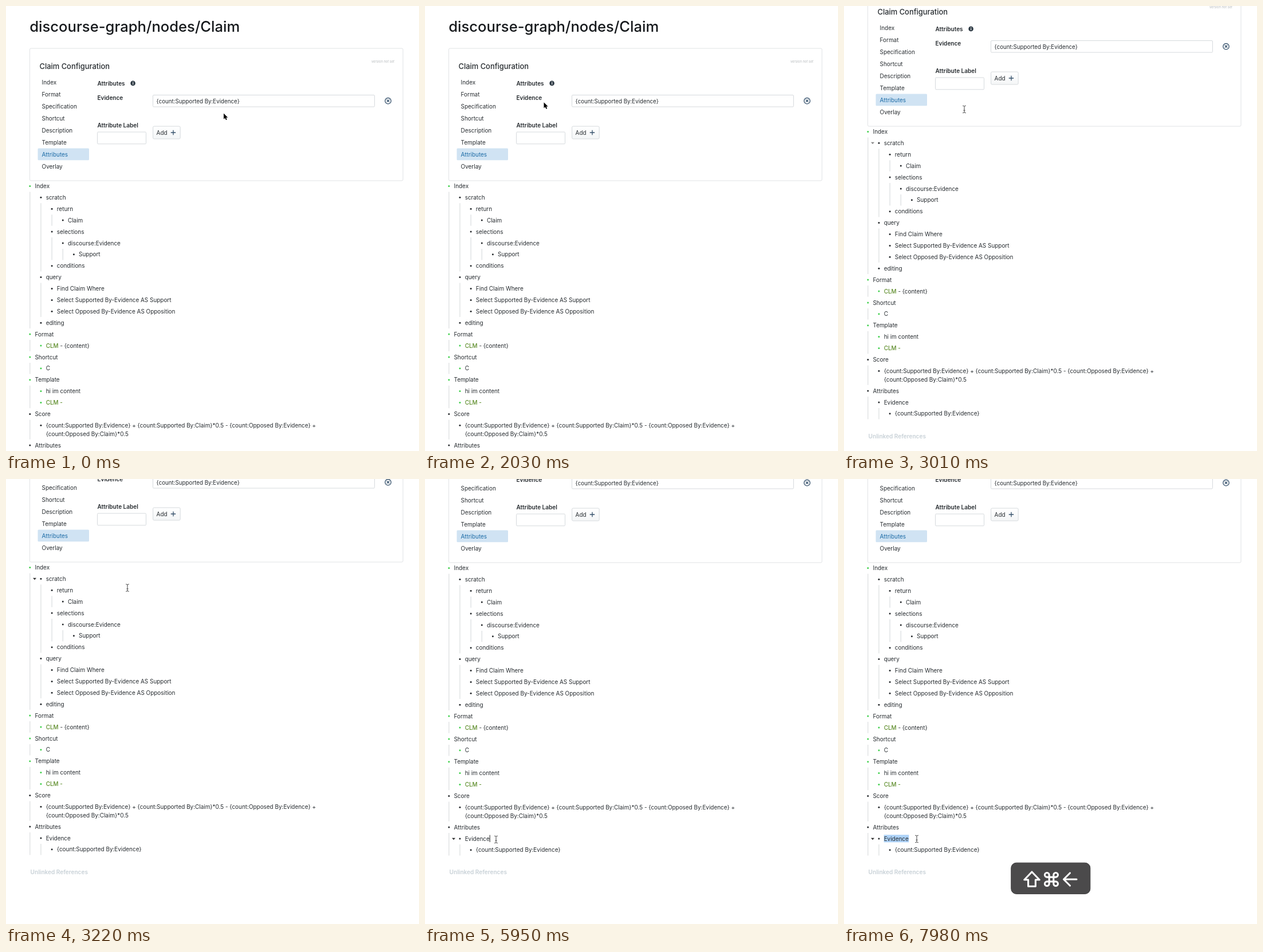
Animation, 721 px wide and 777 px high, one loop 8 s. Source, as an HTML page:

```html
<!DOCTYPE html>
<html lang="en">
<head>
<meta charset="utf-8">
<title>Claim node settings</title>
<style>
  html, body { margin: 0; width: 100%; height: 100%; overflow: hidden; background: #fff; }
  svg { display: block; width: 721px; height: 777px; }
  text { font: 9.93px Inter, "Liberation Sans", sans-serif; fill: #272c30; white-space: pre; }
  .title { font-size: 25.6px; font-weight: 500; fill: #16191c; }
  .head { font-size: 12.9px; font-weight: 500; }
  .strong { font-size: 10.05px; font-weight: 600; }
  .field { font-size: 9.75px; }
  .note { font-size: 5.76px; font-style: italic; fill: #b4b8bb; text-anchor: end; }
  .faint { font-size: 10.05px; font-weight: 600; fill: #c8d1d7; }
  .tag { fill: #5a8a26; font-weight: 500; }
  .active { fill: #1a6aa5; }
  .box { fill: #fff; stroke: #d6dadd; }
  .icon { fill: none; stroke: #34506b; stroke-width: 1.3; }
  .guide { stroke: #dadddf; stroke-width: 1.2; }
  .keys { fill: none; stroke: #fff; stroke-width: 3.1; stroke-linecap: round; stroke-linejoin: round; }
</style>
</head>
<body>
<svg id="stage" viewBox="0 0 721 777">
  <defs>
    <linearGradient id="btn" x2="0" y2="1">
      <stop stop-color="#fff"/><stop offset="1" stop-color="#f4f6f7"/>
    </linearGradient>
  </defs>
  <g id="page">
    <text class="title" x="41.3" y="44.8">discourse-graph/nodes/Claim</text>
    <rect class="box" x="41.5" y="74" width="651.5" height="231" rx="2" style="stroke:#e0e3e5"/>
    <text class="head" x="58.5" y="110">Claim Configuration</text>
    <text class="note" x="678" y="99.2">version not set</text>
    <rect x="55.5" y="248.5" width="89.5" height="20.8" rx="1.5" fill="#d0e3f3"/>
    <g id="menu"></g>
    <text class="strong" x="159.5" y="138.5">Attributes</text>
    <circle cx="221.6" cy="134.9" r="4.3" fill="#2f3b45"/>
    <path d="M221.7 132.1v1.3M221.7 134.3v3" stroke="#fff" stroke-width="1.2"/>
    <text class="strong" x="159.5" y="163.8">Evidence</text>
    <rect class="box" x="256.5" y="155.5" width="387" height="20.5" rx="1.5"/>
    <text class="field" x="262.6" y="169.5">{count:Supported By:Evidence}</text>
    <circle class="icon" cx="667" cy="165.7" r="5.2"/>
    <path class="icon" d="M664.8 163.5l4.4 4.4m0-4.4l-4.4 4.4"/>
    <text class="strong" x="159.5" y="212.2">Attribute Label</text>
    <rect class="box" x="159.5" y="220" width="85" height="20.8" rx="1.5"/>
    <rect class="box" x="256.6" y="210" width="47.6" height="22" rx="2" style="fill:url(#btn)"/>
    <text x="262.6" y="224.6">Add</text>
    <path class="icon" d="M287.8 221h8.4M292 216.8v8.4"/>
    <rect id="mark" x="69.6" y="780.3" width="43.7" height="13" fill="#add2f8"/>
    <g id="tree"></g>
    <path id="caret" d="M113.2 780.6v12.4" stroke="#222" stroke-width="1"/>
    <path id="toggle" d="M-3 -1.5H3L0 2Z" fill="#333"/>
  </g>
  <text id="refs" class="faint" x="42.6">Unlinked References</text>
  <g id="badge">
    <rect x="291.8" y="670.2" width="138" height="54.2" rx="9" fill="#4b4a4b" stroke="#3c3b3c"/>
    <g class="keys">
      <path d="M328 686l13.2 13.8h-6.8v11.4h-12.8v-11.4h-6.8z"/>
      <path transform="translate(362 699) scale(1.28) translate(-12 -12)" stroke-width="2.4"
        d="M18 3a3 3 0 0 0-3 3v12a3 3 0 1 0 3-3H6a3 3 0 1 0 3 3V6a3 3 0 1 0-3 3h12a3 3 0 0 0 0-6z"/>
      <path d="M406 699H384M394.5 688l-11 11 11 11"/>
    </g>
  </g>
  <path id="arrow" d="M0 0V10L2.3 8 4 11.5 5.8 10.7 4.1 7.2H7.2Z" fill="#000" stroke="#fff" stroke-width=".9" paint-order="stroke"/>
  <path id="beam" d="M-2.8 -6.3Q0 -6.3 0 -4.8Q0 -6.3 2.8 -6.3M0 -4.8V4.8M-2.8 6.3Q0 6.3 0 4.8Q0 6.3 2.8 6.3M-1.5 1.8H1.5" fill="none" stroke="#444" stroke-width="1"/>
</svg>
<script>
const NS = "http://www.w3.org/2000/svg";
const LOOP = 8000, STEP = 70;
const $ = id => document.getElementById(id);

function add(parent, tag, attrs, text) {
  const el = document.createElementNS(NS, tag);
  for (const key in attrs) el.setAttribute(key, attrs[key]);
  if (text) el.textContent = text;
  return parent.appendChild(el);
}

["Index", "Format", "Specification", "Shortcut", "Description", "Template", "Attributes", "Overlay"]
  .forEach((label, i) => add($("menu"), "text",
    { x: 62.6, y: 136.6 + 21 * i, class: label === "Attributes" ? "active" : "" }, label));

// Leading dots give the depth, "+" a green bullet, "~" splits tag from plain text.
const outline = `+Index
.scratch
..return
...Claim
..selections
...discourse:Evidence
....Support
..conditions
.query
..Find Claim Where
..Select Supported By-Evidence AS Support
..Select Opposed By-Evidence AS Opposition
.editing
+Format
.+CLM~ - {content}
+Shortcut
.+C
+Template
.+hi im content
.+CLM -~
Score
.{count:Supported By:Evidence} + {count:Supported By:Claim}*0.5 - {count:Opposed By:Evidence} +|{count:Opposed By:Claim}*0.5
Attributes
.Evidence
..{count:Supported By:Evidence}`;

const ROW = 19.9, INDENT = 19.15, WRAP = 14.8;
let rowY = 314.4;
const rows = outline.split("\n").map(line => {
  const [, dots, green, body] = line.match(/^(\.*)(\+?)(.*)$/);
  const lines = body.split("|");
  const row = { depth: dots.length, green, lines, y: rowY };
  row.end = rowY + (lines.length - 1) * WRAP;
  rowY = row.end + ROW;
  return row;
});

rows.forEach((row, i) => {
  const x = 41.8 + row.depth * INDENT;
  let last = i;
  while (rows[last + 1] && rows[last + 1].depth > row.depth) last++;
  if (last > i) add($("tree"), "line",
    { class: "guide", x1: x, x2: x, y1: row.end + 10, y2: rows[last].end + 9.7 });
  add($("tree"), "circle", { cx: x, cy: row.y, r: 1.5, fill: row.green ? "#3fd04b" : "#25292c" });
  row.lines.forEach((line, n) => {
    const text = add($("tree"), "text", { x: x + 8.7, y: row.y + 3.6 + n * WRAP });
    const parts = line.split("~");
    if (parts.length > 1) add(text, "tspan", { class: "tag" }, parts.shift());
    if (parts[0]) add(text, "tspan", {}, parts[0]);
  });
});

const clamp = v => Math.max(0, Math.min(1, v));
const ramp = (t, a, b) => clamp((t - a) / (b - a));
const smooth = u => u * u * (3 - 2 * u);

// Pointer stops: time, x, y
const stops = [
  [0, 380, 187.6], [420, 380, 187.6], [1680, 207.5, 168.3], [2590, 207.5, 168.3],
  [2800, 208, 170.8], [3220, 212, 190], [3430, 212, 190], [3500, 212, 194],
  [3710, 212, 194], [3780, 212, 197], [3990, 212, 197], [4620, 120.5, 626],
  [4900, 120.5, 626], [5250, 119, 609], [5600, 119, 609], [5880, 124, 629.5],
  [6650, 124, 629.5], [7210, 127, 628.5], [LOOP, 127, 628.5]
];

function pointer(t) {
  const i = Math.max(1, stops.findIndex(s => s[0] >= t));
  const [t0, x0, y0] = stops[i - 1], [t1, x1, y1] = stops[i];
  const u = smooth(ramp(t, t0, t1));
  return [x0 + (x1 - x0) * u, y0 + (y1 - y0) * u];
}

// Hovered rows: start, end, x, y
const hovers = [
  [2940, 3430, 50, 334.3], [4620, 5250, 50, 787.2], [5250, 5740, 31, 767.2], [5740, LOOP, 50, 787.2]
];

const show = (el, on) => el.setAttribute("visibility", on ? "visible" : "hidden");
const move = (el, x, y) => el.setAttribute("transform", `translate(${x} ${y})`);

function draw(ms) {
  const t = Math.floor(ms / STEP) * STEP;
  const editing = t >= 5950, selected = t >= 7210;
  const scroll = Math.round(160 * smooth(ramp(t, 2765, 3200)));
  move($("page"), 0, editing ? 1 - scroll : -scroll);
  $("refs").setAttribute("y", 850.1 - scroll);

  const hover = hovers.find(h => t >= h[0] && t < h[1]);
  show($("toggle"), hover);
  if (hover) {
    move($("toggle"), hover[2], hover[3]);
    $("toggle").setAttribute("opacity", 0.2 + 0.8 * ramp(t, hover[0], hover[0] + 150));
  }

  show($("mark"), selected);
  show($("badge"), selected);
  show($("caret"), editing && !selected && (t - 5950) % 1000 < 730);

  const [x, y] = pointer(t), text = t >= 2940;
  show($("arrow"), !text);
  show($("beam"), text);
  move(text ? $("beam") : $("arrow"), x, y);
}

const start = performance.now();
function tick() {
  draw((performance.now() - start) % LOOP);
  requestAnimationFrame(tick);
}
tick();
</script>
</body>
</html>
```
